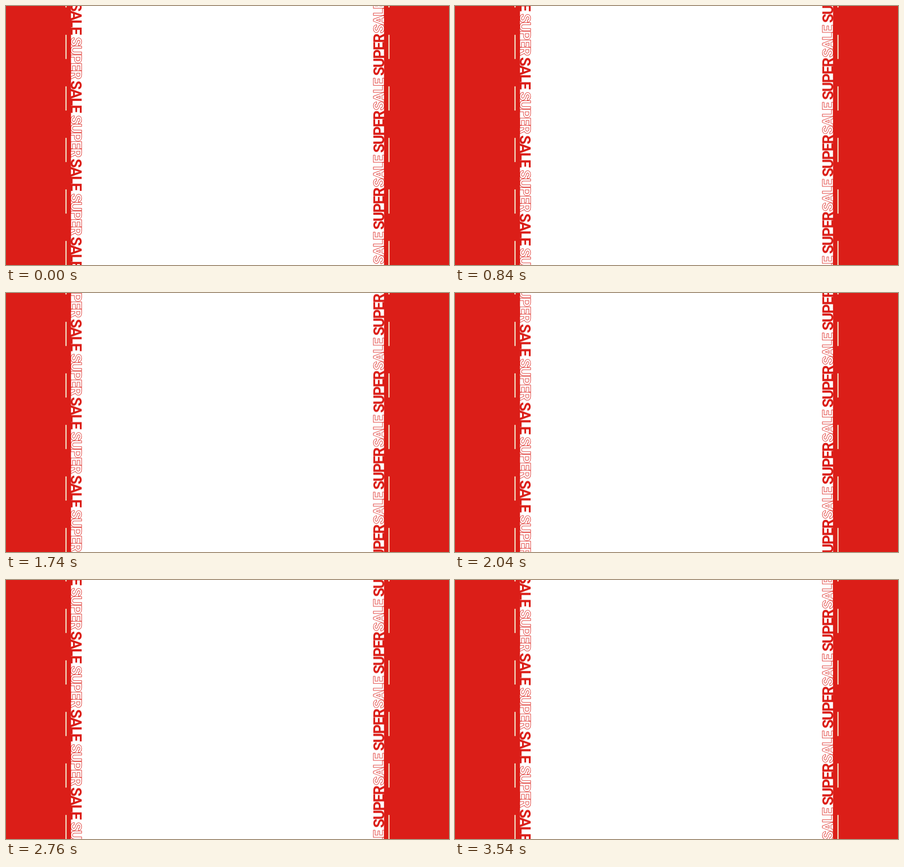
An HTML page that plays this animation: 978x573 px, repeating every 3.6 s.

```html
<!DOCTYPE html>
<html lang="en">
<head>
<meta charset="utf-8">
<title>Super sale</title>
<style>
  html, body { margin: 0; width: 100%; height: 100%; overflow: hidden; background: #fff; }
  svg { display: block; width: 978px; height: 573px; }
  text { font: 700 33px Roboto, sans-serif; letter-spacing: -2.3px; }
  .solid { fill: #db1e18; }
  .outline { fill: none; stroke: #db1e18; stroke-width: 1; stroke-linejoin: round; }
  .dash { stroke: #f1d6bb; stroke-width: 2.8; stroke-dasharray: 53.5 60.5; }
</style>
</head>
<body>
<svg viewBox="0 0 978 573">
  <g id="left"></g>
  <g id="right"></g>
  <path class="solid" d="M0 0H143.5V573H0ZM834.5 0H978V573H834.5Z"/>
  <path class="dash" d="M132.5 -50.3V573M845.5 -50.3V573"/>
</svg>
<script>
const NS = 'http://www.w3.org/2000/svg';

// Each ribbon repeats its words down the stage; y is where a word begins.
const ribbons = [
  { id: 'left', x: 142.9, angle: 90, period: 172.8, travel: -111.4,
    words: [['SUPER', 'outline', 68.8], ['SALE', 'solid', 165]] },
  { id: 'right', x: 834.8, angle: -90, period: 170.3, travel: 114.3,
    words: [['SUPER', 'solid', 154.4], ['SALE', 'outline', 230.9]] }
];

function addWord(parent, label, style, x, y, angle) {
  const text = document.createElementNS(NS, 'text');
  text.setAttribute('class', style);
  text.setAttribute('transform', `translate(${x} ${y}) rotate(${angle})`);
  text.textContent = label;
  parent.append(text);
}

for (const { id, x, angle, period, travel, words } of ribbons) {
  const group = document.getElementById(id);
  for (let i = -2; i <= 4; i++) {
    for (const [label, style, y] of words) {
      addWord(group, label, style, x, y + i * period, angle);
    }
  }
  // Out and back at a constant speed, in 60 ms steps.
  const at = y => ({ transform: `translateY(${y}px)`, easing: 'steps(30)' });
  group.animate([at(0), at(travel), at(0)], { duration: 3600, iterations: Infinity });
}
</script>
</body>
</html>
```
